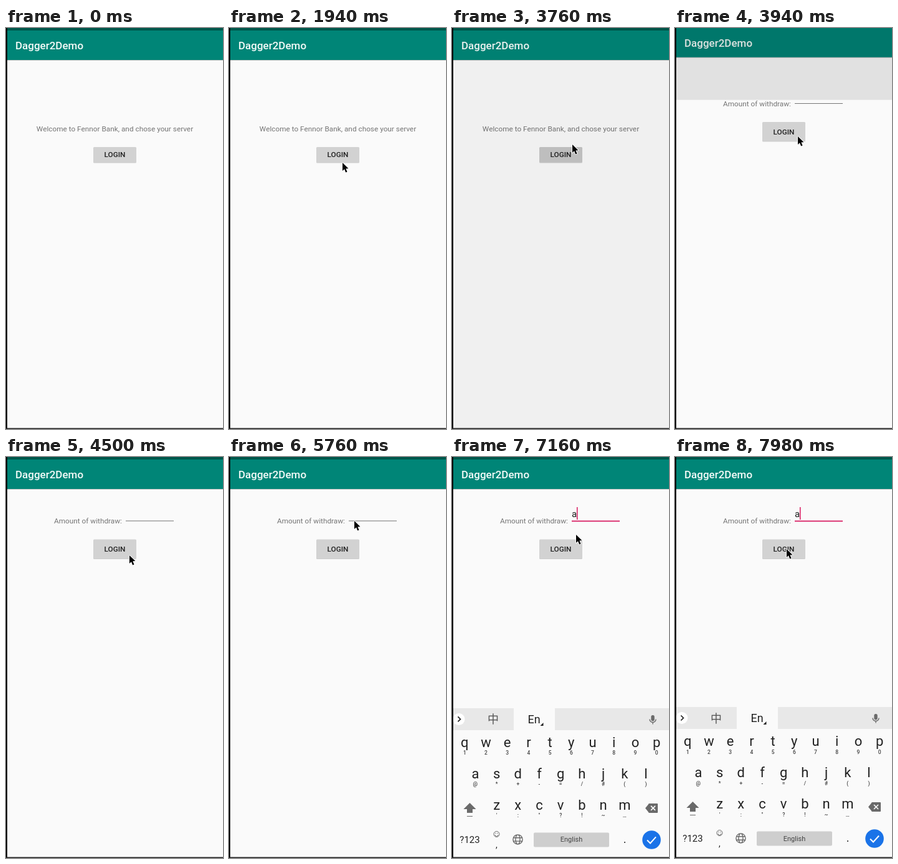
Write an HTML page with a canvas that moves like this. It is 348x640 px and loops after 8 s.

```html
<!DOCTYPE html>
<html lang="en">
<head>
<meta charset="utf-8">
<title>Dagger2Demo</title>
<style>
html, body { margin: 0; width: 100%; height: 100%; overflow: hidden; background: #fafafa; }
canvas { display: block; width: 348px; height: 640px; }
</style>
</head>
<body>
<canvas id="stage"></canvas>
<script>
const W = 348, H = 640, LOOP = 8000;
const PAPER = '#fafafa', PRIMARY = '#008577', DARK = '#00574b', ACCENT = '#d81b60';
const BUTTON = '#d2d2d2', INK = '#212121', GREY = '#757575', ICON = '#6a6a6a';

// Times of the events, in ms
const PRESS = 3600, DIM = 3700, OPEN = 3825, FOCUS = 6100, KEYS = 6860, TYPED = 6960;

// Pointer stops: time, x, y
const route = [[1660, 0, 473], [1940, 182, 215], [2920, 188, 206], [3760, 193, 186],
  [3940, 197, 173], [5760, 201, 102], [6320, 187, 104], [7160, 199, 124], [7980, 179, 147]];

const canvas = document.getElementById('stage');
const ctx = canvas.getContext('2d');
const dpr = window.devicePixelRatio || 1;
canvas.width = W * dpr;
canvas.height = H * dpr;

const span = (t, a, length) => Math.max(0, Math.min(1, (t - a) / length));
const smooth = u => u * u * (3 - 2 * u);
const lerp = (a, b, u) => a + (b - a) * u;

// Cubic bezier (.4, 0, .2, 1), solved by bisection.
function fastOutSlowIn(x) {
  let lo = 0, hi = 1, s = 0;
  for (let i = 0; i < 20; i++) {
    s = (lo + hi) / 2;
    const at = 1.2 * s * (1 - s) ** 2 + 0.6 * s * s * (1 - s) + s ** 3;
    if (at < x) lo = s; else hi = s;
  }
  return smooth(s);
}

function layer(dx, dy, paint) {
  ctx.save();
  ctx.translate(dx, dy);
  paint();
  ctx.restore();
}

function rect(x, y, w, h, color, r = 0) {
  ctx.beginPath();
  ctx.roundRect(x, y, w, h, r);
  ctx.fillStyle = color;
  ctx.fill();
}

function text(s, x, y, size, { color = INK, weight = 400, align = 'center', family = 'Roboto' } = {}) {
  ctx.font = `${weight} ${size}px ${family}, sans-serif`;
  ctx.textAlign = align;
  ctx.fillStyle = color;
  ctx.fillText(s, x, y);
}

function trace(points) {
  ctx.beginPath();
  points.forEach(([x, y]) => ctx.lineTo(x, y));
}

function fill(points, color) {
  trace(points);
  ctx.fillStyle = color;
  ctx.fill();
}

function stroke(points, color, width) {
  trace(points);
  ctx.strokeStyle = color;
  ctx.lineWidth = width;
  ctx.stroke();
}

function circle(x, y, r, color) {
  ctx.beginPath();
  ctx.arc(x, y, r, 0, 2 * Math.PI);
  ctx.fillStyle = color;
  ctx.fill();
}

function page() {
  rect(0, 0, W, H + 30, PAPER);
  rect(0, 0, W, 4, DARK);
  rect(0, 4, W, 47, PRIMARY);
  rect(0, 51, W, 1, 'rgba(0,0,0,.22)');
  text('Dagger2Demo', 15, 34, 17, { color: '#f4faf8', weight: 500, align: 'left' });
}

function loginButton(y, h, pressed = 0) {
  rect(140, y + 1, 69, h, 'rgba(0,0,0,.18)', 1.5);
  rect(140, y, 69, h, BUTTON, 1.5);
  rect(140, y, 69, h, `rgba(0,0,0,${0.06 * pressed})`, 1.5);
  text('LOGIN', 174.5, y + h / 2 + 4.2, 11.8, { weight: 500 });
}

function welcomePage(t) {
  page();
  text('Welcome to Fennor Bank, and chose your server', 174.5, 165, 11.8, { color: GREY });
  loginButton(190, 24.5, span(t, PRESS, 140));
  rect(0, 0, W, H + 30, `rgba(0,0,0,${0.1 * span(t, DIM, 150)})`);
}

function withdrawPage(t) {
  const typed = t >= TYPED, focused = t >= FOCUS;
  page();
  text('Amount of withdraw:', 77, 106, 11.8, { color: GREY, align: 'left' });
  rect(192, 101.5, 77, focused ? 1.8 : 1, focused ? ACCENT : GREY);
  if (typed) {
    text('a', 192, 96, 15, { align: 'left' });
    if ((t - TYPED) % 1000 < 500) rect(200, 80, 1.5, 20, ACCENT);
  }
  loginButton(131.5, 30.5);
}

function toolbar() {
  rect(0, 399, W, 35, '#e8e8e8');
  rect(99, 399, 66, 35, PAPER);
  circle(11, 416.5, 9.5, '#fff');
  stroke([[9.5, 412.5], [13.5, 416.5], [9.5, 420.5]], INK, 1.7);
  text('中', 66, 423.5, 18, { color: '#555', family: '"Noto Sans CJK SC", "Noto Sans CJK"' });
  text('En', 131.5, 423, 18);
  fill([[146.5, 422], [146.5, 427], [141.5, 427]], INK);
  layer(322, 416.5, () => {
    rect(-2.7, -6.5, 5.4, 9.5, ICON, 2.7);
    ctx.beginPath();
    ctx.arc(0, 0, 5, 0, Math.PI);
    ctx.moveTo(0, 5);
    ctx.lineTo(0, 8);
    ctx.strokeStyle = ICON;
    ctx.lineWidth = 1.4;
    ctx.stroke();
  });
}

function letterRows() {
  const rows = [['qwertyuiop', '1234567890', 20.3], ['asdfghjkl', '@*+-=/#()', 37.4],
    ['zxcvbnm', '\':"?!~…', 71.6]];
  rows.forEach(([letters, marks, x], row) => {
    [...letters].forEach((c, i) => {
      const cx = x + 34.2 * i, y = 461 + 50 * row;
      text(c, cx, y, 22);
      text(marks[i], cx, y + 12.5, 8.5, { weight: 500, color: '#444' });
    });
  });
}

function shiftKey() {
  fill([[-10, 1], [0, -9], [10, 1]], ICON);
  rect(-4.5, 0, 9, 7, ICON);
  rect(-4.5, 12, 9, 1, ICON);
}

function deleteKey() {
  fill([[-10, 0], [-4, -7.5], [-4, 7.5]], ICON);
  rect(-4.5, -7.5, 14.5, 15, ICON, 1);
  for (const d of [-3.5, 3.5]) stroke([[-1, -d], [6, d]].map(([x, y]) => [x, y]), PAPER, 1.6);
}

function smiley() {
  ctx.beginPath();
  ctx.arc(0, 0, 4.5, 0, 2 * Math.PI);
  ctx.moveTo(2.5, 1);
  ctx.arc(0, 1, 2.5, 0, Math.PI);
  ctx.strokeStyle = ICON;
  ctx.lineWidth = 1;
  ctx.stroke();
  for (const x of [-1.6, 1.6]) circle(x, -1.5, 0.7, ICON);
}

function globe() {
  ctx.beginPath();
  for (const r of [3.5, 7.6]) {
    ctx.moveTo(r, 0);
    ctx.ellipse(0, 0, r, 7.6, 0, 0, 2 * Math.PI);
  }
  for (const y of [-2.7, 2.7]) {
    ctx.moveTo(-7, y);
    ctx.lineTo(7, y);
  }
  ctx.strokeStyle = ICON;
  ctx.lineWidth = 1.4;
  ctx.stroke();
}

function doneKey() {
  circle(0, 0, 14.8, '#1a73e8');
  stroke([[-7, 0.5], [-2, 5.5], [7, -4.5]], '#fff', 2);
}

function keyboard(t) {
  const u = span(t, KEYS, 420);
  if (!u) return;
  layer(0, 24 * (1 - u) ** 2, () => {
    ctx.globalAlpha = Math.min(1, u * 1.6);
    rect(0, 399, W, 270, PAPER);
    toolbar();
    letterRows();
    layer(28.5, 559, shiftKey);
    layer(320, 558.5, deleteKey);
    layer(71.5, 600, smiley);
    layer(105.5, 608.5, globe);
    layer(320, 609, doneKey);
    text('?123', 28.5, 614, 15);
    text(',', 71.5, 622, 14);
    text('.', 277, 614, 18);
    rect(131, 597.5, 121, 23, '#cecece', 2);
    text('English', 191.5, 612.5, 11, { color: '#444' });
  });
}

function pointer(t) {
  if (t < route[0][0]) return;
  const next = route.findIndex(([time]) => time > t);
  const i = next < 0 ? route.length - 1 : next;
  const [t0, x0, y0] = route[i - 1], [t1, x1, y1] = route[i];
  const u = smooth(span(t, t0, t1 - t0));
  layer(lerp(x0, x1, u), lerp(y0, y1, u), () => {
    const arrow = [[0, 0], [0, 13], [3, 10.3], [5.2, 15.5], [7.6, 14.5], [5.4, 9.4], [9.5, 9.2], [0, 0]];
    ctx.lineJoin = 'round';
    stroke(arrow, '#fff', 1.8);
    fill(arrow, '#000');
  });
}

function draw(t) {
  const u = span(t, OPEN, 430), p = fastOutSlowIn(u);
  if (u < 1) layer(0, -15 * p, () => welcomePage(t));
  // The new page rises while its clip opens upwards.
  if (u > 0) layer(0, 26 * (1 - p), () => {
    ctx.beginPath();
    ctx.rect(0, 614 * (1 - u) ** 5.9, W, H);
    ctx.clip();
    withdrawPage(t);
  });
  keyboard(t);
  rect(0, 0, 2, H, '#050505');
  rect(0, 638.5, W, 1.5, '#222');
  pointer(t);
}

function tick() {
  ctx.setTransform(dpr, 0, 0, dpr, 0, 0);
  draw((performance.now() - start) % LOOP);
  requestAnimationFrame(tick);
}

const start = performance.now();
tick();
</script>
</body>
</html>
```
